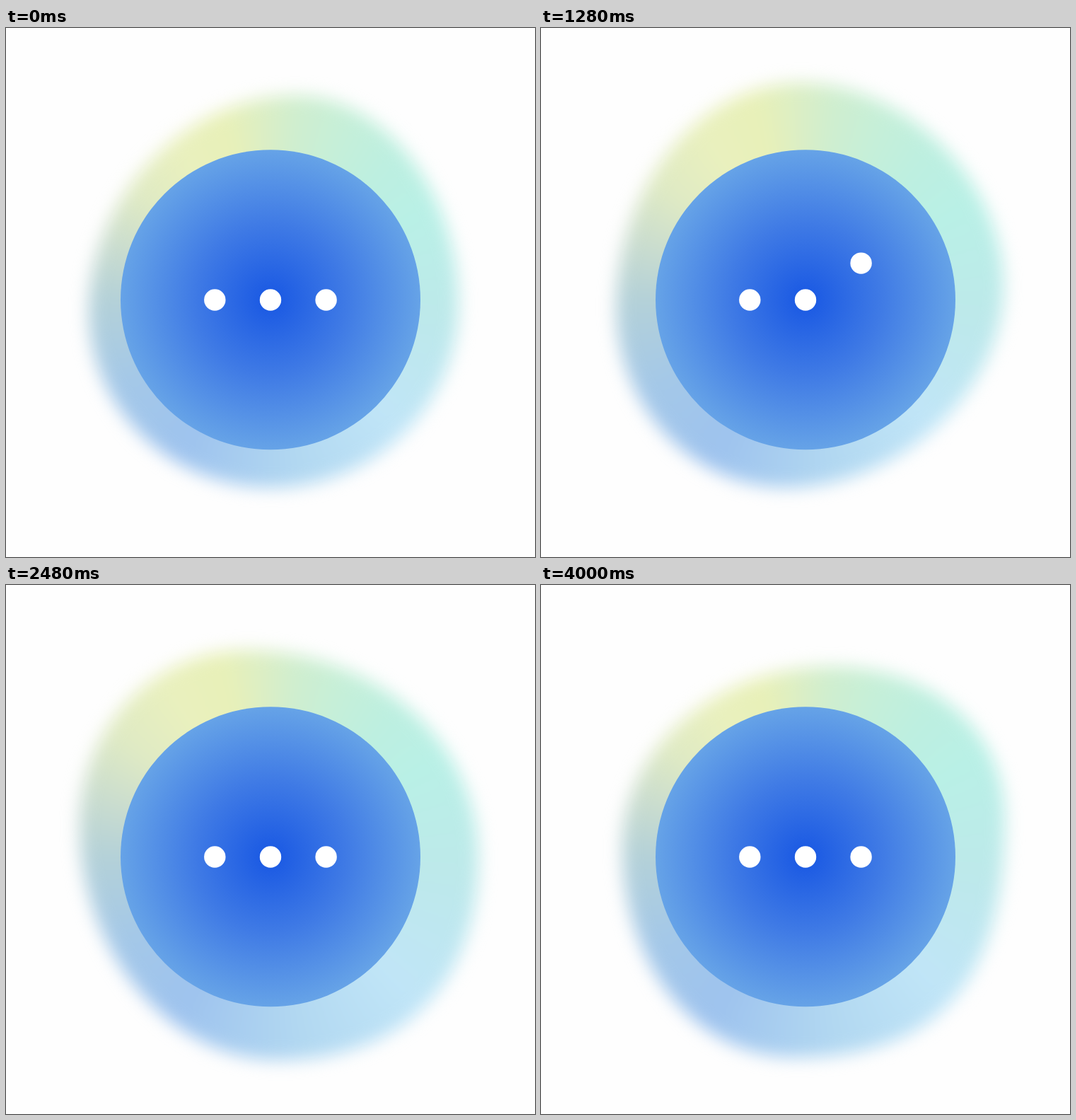
Recreate the animation shown at these times as an HTML page. Size 748x748 px, loop 4080 ms.

```html
<!DOCTYPE html>
<html lang="en">
<head>
<meta charset="utf-8">
<title>Thinking orb</title>
<style>
  html, body { margin: 0; width: 100%; height: 100%; overflow: hidden; background: #fefefe; }
  .stage { position: relative; width: 748px; height: 748px; overflow: hidden; }
  .glow { position: absolute; inset: 0; filter: blur(12px); }
  .blob {
    width: 100%; height: 100%;
    background: conic-gradient(from 0deg at 374px 384px,
      #d9eec7 0deg, #cfeecf 8deg, #c5efd9 24deg, #bdefe0 40deg, #b9f0e6 60deg,
      #bde9ea 95deg, #c0e5f7 135deg, #b2d8f1 170deg, #9ec3ee 210deg,
      #a4c8e8 240deg, #b4d1d8 270deg, #c9dccf 288deg, #dfeac4 308deg,
      #e9f0be 328deg, #e8f0b8 346deg, #d9eec7 360deg);
  }
  svg { position: absolute; inset: 0; }
</style>
</head>
<body>
<div class="stage">
  <div class="glow"><div class="blob" id="blob"></div></div>
  <svg width="748" height="748" viewBox="0 0 748 748">
    <defs>
      <radialGradient id="core">
        <stop offset="0" stop-color="#1857e3"/>
        <stop offset=".5" stop-color="#3f7ae5"/>
        <stop offset="1" stop-color="#66a3e7"/>
      </radialGradient>
    </defs>
    <circle cx="374" cy="384.3" r="212" fill="url(#core)"/>
    <g id="dots" fill="#fff">
      <circle cx="295.3" cy="384.5" r="15.2"/>
      <circle cx="374" cy="384.5" r="15.2"/>
      <circle cx="452.6" cy="384.5" r="15.2"/>
    </g>
  </svg>
</div>
<script>
const LOOP = 4080, STEP = 80;

// Per pose: time, top x/y, right x/y, bottom x/y, left x/y,
// then corner roundness: top right, bottom right, bottom left, top left.
const POSES = [
  [0,    410, 95,  640, 390, 375, 650, 117, 400, .54, .55, .55, .53],
  [560,  415, 85,  648, 385, 385, 677, 104, 390, .54, .50, .53, .52],
  [960,  395, 82,  653, 385, 360, 663, 97,  390, .54, .51, .54, .53],
  [1600, 345, 75,  656, 350, 345, 643, 115, 395, .50, .53, .56, .56],
  [2480, 340, 92,  668, 385, 385, 672, 104, 340, .56, .62, .54, .56],
  [3040, 380, 108, 667, 370, 400, 660, 90,  350, .58, .64, .56, .55],
  [4000, 410, 115, 656, 330, 360, 668, 115, 370, .58, .68, .57, .55]
];
const DOT_PEAKS = [560, 960, 1360], RISE = 270, FALL = 262, LIFT = 65;

const blob = document.getElementById('blob');
const dots = [...document.getElementById('dots').children];

function slope(i, k) {
  const a = POSES[Math.max(i - 1, 0)], b = POSES[Math.min(i + 1, POSES.length - 1)];
  return (b[k] - a[k]) / (b[0] - a[0]);
}

// Cubic Hermite blend through the poses.
function poseAt(t) {
  let i = 0;
  while (i < POSES.length - 2 && t >= POSES[i + 1][0]) i++;
  const a = POSES[i], b = POSES[i + 1], span = b[0] - a[0];
  const u = Math.min((t - a[0]) / span, 1), v = 1 - u;
  return a.slice(1).map((start, n) => {
    const k = n + 1;
    return start * v * v * (1 + 2 * u) + b[k] * u * u * (3 - 2 * u)
      + span * u * v * (v * slope(i, k) - u * slope(i + 1, k));
  });
}

function blobPath([tx, ty, rx, ry, bx, by, lx, ly, tr, br, bl, tl]) {
  const curve = (...p) => 'C' + p.map(n => n.toFixed(2)).join(' ');
  return `M${tx.toFixed(2)} ${ty.toFixed(2)}`
    + curve(tx + (rx - tx) * tr, ty, rx, ry + (ty - ry) * tr, rx, ry)
    + curve(rx, ry + (by - ry) * br, bx + (rx - bx) * br, by, bx, by)
    + curve(bx + (lx - bx) * bl, by, lx, ly + (by - ly) * bl, lx, ly)
    + curve(lx, ly + (ty - ly) * tl, tx + (lx - tx) * tl, ty, tx, ty) + 'Z';
}

function lift(t) {
  const u = Math.min(Math.abs(t) / (t < 0 ? RISE : FALL), 1);
  return LIFT * (1 + Math.cos(Math.PI * u)) / 2;
}

function draw(now) {
  const t = Math.floor((now % LOOP) / STEP) * STEP;
  blob.style.clipPath = `path("${blobPath(poseAt(t))}")`;
  dots.forEach((dot, i) => dot.setAttribute('cy', 384.5 - lift(t - DOT_PEAKS[i])));
}

const began = performance.now();
function tick() {
  draw(performance.now() - began);
  requestAnimationFrame(tick);
}
tick();
</script>
</body>
</html>
```
